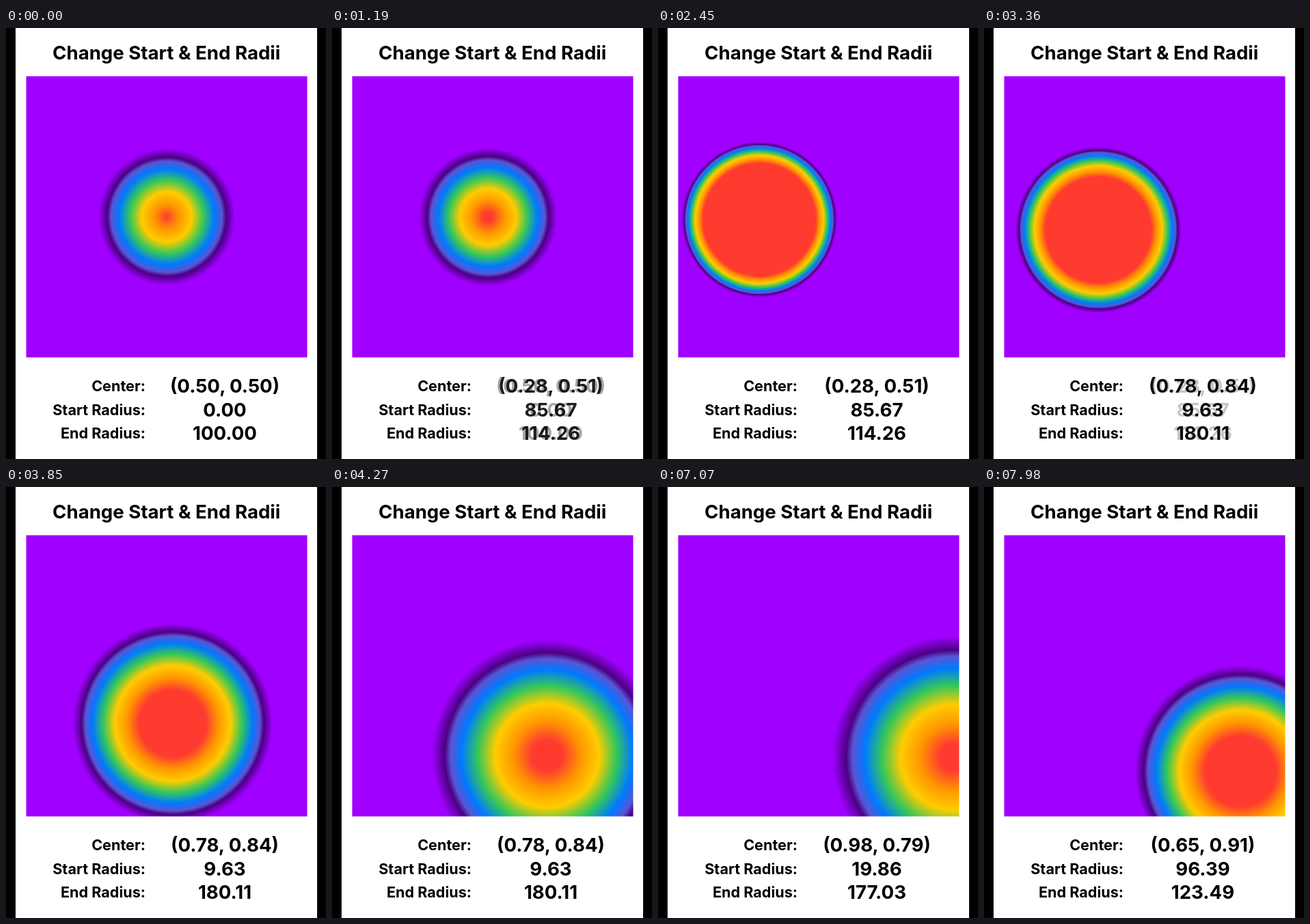
An HTML page that plays this animation: 468x630 px, repeating every 8 s.

```html
<!DOCTYPE html>
<html lang="en">
<head>
<meta charset="utf-8">
<title>Change Start &amp; End Radii</title>
<style>
  html, body { margin: 0; width: 100%; height: 100%; overflow: hidden; background: #fff; }
  svg { display: block; }
  text { font: 650 27.6px Inter, Roboto, sans-serif; text-anchor: middle; }
  .label { font-size: 21.6px; text-anchor: end; }
</style>
</head>
<body>
<svg width="468" height="630" viewBox="0 0 468 630">
  <defs>
    <radialGradient id="rainbow" gradientUnits="userSpaceOnUse">
      <stop offset="0" stop-color="#ff3b30"/>
      <stop offset=".18" stop-color="#ff9500"/>
      <stop offset=".365" stop-color="#ffcc00"/>
      <stop offset=".54" stop-color="#34c759"/>
      <stop offset=".7" stop-color="#007aff"/>
      <stop offset=".81" stop-color="#5856d6"/>
      <stop offset=".87" stop-color="#4b0082"/>
      <stop offset="1" stop-color="#a000ff"/>
    </radialGradient>
  </defs>
  <rect width="14" height="630"/>
  <rect x="455" width="13" height="630"/>
  <text x="234.7" y="46">Change Start &amp; End Radii</text>
  <rect x="29.5" y="70.5" width="411" height="411" fill="url(#rainbow)"/>
  <text class="label" x="204" y="531">Center:</text>
  <text class="label" x="204" y="565.5">Start Radius:</text>
  <text class="label" x="204" y="600">End Radius:</text>
  <g class="values"><text x="320" y="533"/><text x="320" y="567.5"/><text x="320" y="602"/></g>
  <g class="values"><text x="320" y="533"/><text x="320" y="567.5"/><text x="320" y="602"/></g>
</svg>
<script>
const LOOP = 8000, FIRST = 825, PERIOD = 2100, MOVE = 1890, FADE = 560;

// center x, center y, start radius, end radius
const states = [
  [.5, .5, 0, 100],
  [.28, .51, 85.67, 114.26],
  [.78, .84, 9.63, 180.11],
  [.98, .79, 19.86, 177.03],
  [.65, .91, 96.39, 123.49]
];

const gradient = document.getElementById('rainbow');
const [oldValues, newValues] = document.querySelectorAll('.values');
const clamp = v => Math.min(1, Math.max(0, v));

// cubic-bezier(.42, 0, .58, 1)
function easeInOut(x) {
  let lo = 0, hi = 1;
  for (let i = 0; i < 24; i++) {
    const u = (lo + hi) / 2, v = 1 - u;
    if (3 * v * v * u * .42 + 3 * v * u * u * .58 + u ** 3 < x) lo = u;
    else hi = u;
  }
  return lo * lo * (3 - 2 * lo);
}

function showValues(group, state, alpha) {
  const [x, y, r0, r1] = state.map(n => n.toFixed(2));
  [`(${x}, ${y})`, r0, r1].forEach((s, i) => {
    if (group.children[i].textContent !== s) group.children[i].textContent = s;
  });
  group.setAttribute('opacity', alpha);
}

function draw(time) {
  const step = Math.floor((time - FIRST) / PERIOD);
  const from = states[Math.max(0, step)], to = states[step + 1];
  const age = Math.max(0, time - FIRST - step * PERIOD);
  const p = easeInOut(clamp(age / MOVE));
  const [x, y, r0, r1] = from.map((v, i) => v + (to[i] - v) * p);
  const geometry = { cx: 30 + 410 * x, cy: 71 + 410 * y, fr: r0, r: r1 };
  for (const name in geometry) gradient.setAttribute(name, geometry[name]);

  const fade = clamp(age / FADE);
  showValues(oldValues, from, 1 - fade);
  showValues(newValues, to, fade * (2 - fade));
}

const start = performance.now();
function tick() {
  draw((performance.now() - start) % LOOP);
  requestAnimationFrame(tick);
}
tick();
</script>
</body>
</html>
```
